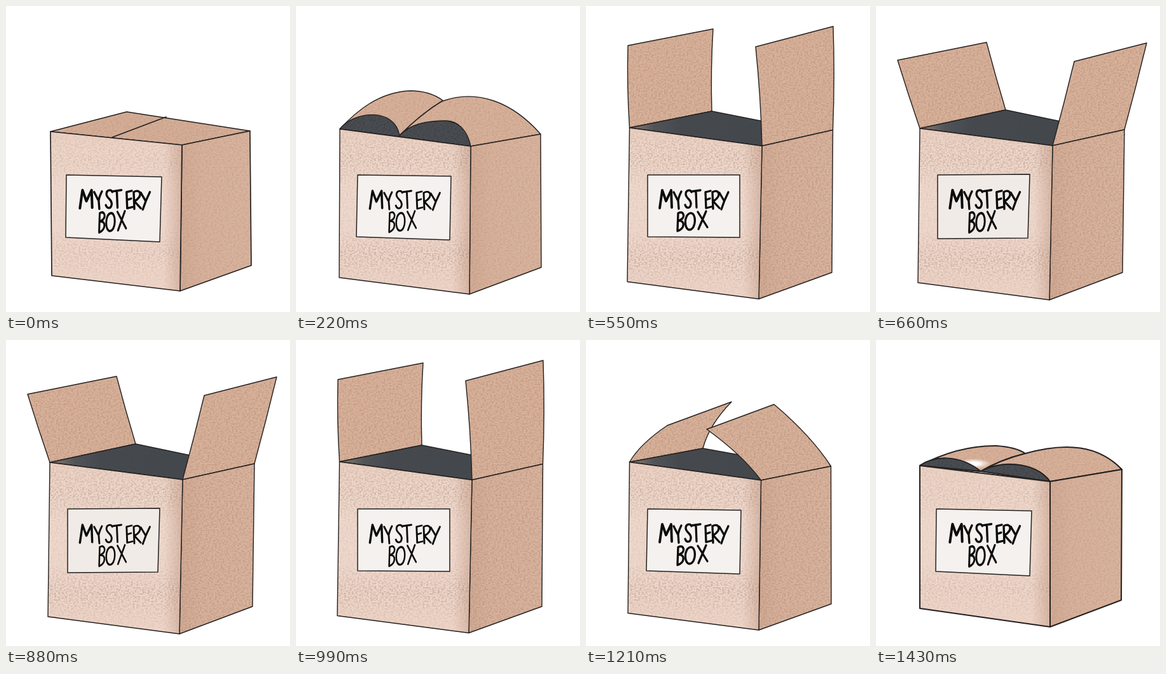
Write an HTML page that moves like this. It is 447x480 px and loops after 1540 ms.

```html
<!DOCTYPE html>
<html lang="en">
<head>
<meta charset="utf-8">
<title>Mystery box</title>
<style>
html, body { margin: 0; width: 100%; height: 100%; overflow: hidden; background: #fff; }
svg { display: block; width: 100vw; height: 100vh; }
.ink { stroke: #242121; stroke-linejoin: round; stroke-linecap: round; }
.word { fill: none; stroke: #0b0b0b; stroke-linecap: round; stroke-linejoin: round; }
</style>
</head>
<body>
<svg viewBox="0 0 447 480" role="img" aria-label="Mystery box">
  <defs>
    <linearGradient id="front" x2="0" y2="1">
      <stop offset="0" stop-color="#ebd1c3"/><stop offset=".13" stop-color="#eed7ca"/>
      <stop offset=".5" stop-color="#efd9cd"/><stop offset="1" stop-color="#edd4c7"/>
    </linearGradient>
    <linearGradient id="rim">
      <stop offset=".86" stop-color="#c39a84" stop-opacity="0"/><stop offset="1" stop-color="#c39a84" stop-opacity=".55"/>
    </linearGradient>
    <linearGradient id="side">
      <stop offset="0" stop-color="#d2ab95"/><stop offset=".3" stop-color="#d8b29c"/><stop offset="1" stop-color="#d9b49e"/>
    </linearGradient>
    <linearGradient id="dust" x2="0" y2="1">
      <stop offset="0" stop-color="#8e6a56" stop-opacity=".25"/><stop offset=".18" stop-color="#8e6a56" stop-opacity=".55"/>
      <stop offset=".34" stop-color="#8e6a56" stop-opacity=".2"/><stop offset=".6" stop-color="#8e6a56" stop-opacity=".2"/>
      <stop offset=".76" stop-color="#8e6a56" stop-opacity=".55"/><stop offset="1" stop-color="#8e6a56" stop-opacity=".08"/>
    </linearGradient>
    <linearGradient id="hollow">
      <stop offset="0" stop-color="#8d7d73"/><stop offset=".12" stop-color="#515457"/>
      <stop offset=".25" stop-color="#45494e"/><stop offset="1" stop-color="#42474c"/>
    </linearGradient>
    <radialGradient id="glow">
      <stop offset=".3" stop-color="#fff"/><stop offset="1" stop-color="#fff" stop-opacity="0"/>
    </radialGradient>
    <filter id="grain" x="0" y="0" width="1" height="1" color-interpolation-filters="sRGB">
      <feTurbulence type="fractalNoise" baseFrequency=".34 .42" numOctaves="3" seed="4"/>
      <feColorMatrix values="0 0 0 0 0  0 0 0 0 0  0 0 0 0 0  0 0 0 3 -1.2" result="n"/>
      <feComposite in="SourceGraphic" in2="n" operator="in"/>
    </filter>
  </defs>
  <g id="art"></g>
  <g id="text"></g>
</svg>
<script>
const STEP = 110, COUNT = 14;
const art = document.getElementById('art'), text = document.getElementById('text');

const mix = (a, b, t = .5) => a.map((v, i) => v + (b[i] - v) * t);

// Corners: front tl, tr, br, bl; side tr, br
const shut = [70,197, 277,218, 274,447, 72,423, 384,196, 386,407];
const loose = [69,197, 274,222, 274,450, 69,421, 387,203, 386,408];
const puffed = [69,193, 275,220, 273,452, 68,426, 385,201, 386,410];
const half = [68,190, 276,220, 271,458, 64,431, 386,195, 386,418];
const wide = [69,192, 278,219, 273,461, 66,434, 391,194, 388,418];
const boxes = [shut, loose, puffed, mix(puffed, half), half, mix(half, wide), wide, mix(half, wide, 1.3)];

const tagA = [95,265, 245,268, 242,370, 94,363];
const tagB = [97,265, 244,267, 242,367, 95,362];
const tagC = [97,265, 242,265, 242,363, 97,362];
const tagD = [97,265, 242,264, 239,364, 97,365];
const tags = [tagA, tagA, tagB, tagB, tagC, tagC, tagD, tagD];

// Open lids: free edge of each flap, rear hinge point, sideways bow
const lids = {
  3: { l: [128,134, 229,97], r: [190,140, 296,101], back: [184,170], bow: 13 },
  4: { l: [101,76, 222,56], r: [223,87, 340,70], back: [191,168], bow: 7 },
  5: { l: [66,62, 200,36], r: [267,64, 389,32], back: [198,165], bow: 3 },
  6: { l: [34,85, 174,57], r: [312,87, 426,58], back: [204,163], bow: 1 },
  7: { l: [3,108, 148,72], r: [336,106, 440,72], back: [208,160], bow: -2 }
};

const poly = p => 'M' + p.join(' ') + 'Z';
const path = (d, fill, w = 0) => `<path d="${d}" fill="${fill}"${w ? ` class="ink" stroke-width="${w}"` : ''}/>`;
const grain = (d, fill, o) => `<path d="${d}" fill="${fill}" opacity="${o}" filter="url(#grain)"/>`;
const card = (d, fill, w, o) => path(d, fill) + grain(d, '#8d6450', o) + path(d, 'none', w);

function flap(h1, h2, f, bow) {
  const bend = (a, b) => `Q${(a[0] + b[0]) / 2 + bow} ${(a[1] + b[1]) / 2} ${b.join(' ')}`;
  const a = f.slice(0, 2), b = f.slice(2);
  return `M${h1.join(' ')}${bend(h1, a)}L${b.join(' ')}${bend(b, h2)}Z`;
}

function lidShut(w) {
  return card('M70 197L190 166L384 196L277 218Z', '#d5ae97', w, .17) + path('M252 174L167 206', 'none', w);
}

function lidCurved(left, dark, right, w, gap) {
  return card(left, '#d8b19a', w, .18)
    + (gap ? '<ellipse cx="154" cy="194" rx="27" ry="8" fill="url(#glow)"/>' : '')
    + path(dark, '#4a4e53') + grain(dark, '#2a2e33', .35) + path(dark, 'none', w)
    + card(right, '#d8b19a', w, .18);
}

function lidOpen(k, b, w) {
  const { l, r, back, bow } = lids[k];
  const tl = b.slice(0, 2), tr = b.slice(2, 4), far = b.slice(8, 10);
  const dark = poly([...tl, ...back, far[0], far[1] + 8, ...tr]);
  return card(flap(tl, back, l, -bow), '#d9b29b', w, .27)
    + path(dark, 'url(#hollow)', w)
    + card(flap(tr, far, r, bow), '#d9b29b', w, .27);
}

function lid(k, b, w) {
  if (k === 0) return lidShut(w);
  if (k === 1) return lidCurved(
    'M69 197Q130 165 190 166Q220 168 235 178Q195 188 165 206Z',
    'M69 197C90 182 130 178 165 206C190 190 250 188 274 222L165 206Z',
    'M165 206Q195 188 235 178C300 160 350 165 387 203L274 222C250 188 190 190 165 206Z', w, true);
  if (k === 2) return lidCurved(
    'M69 193C95 165 130 135 180 133Q210 133 231 148Q195 170 163 203Z',
    'M69 193C90 165 155 158 163 203C180 185 200 180 236 180C262 183 272 200 275 220L163 205Z',
    'M163 203Q200 167 231 149C285 130 340 150 385 201L275 220C270 195 255 180 236 180C205 180 180 185 163 203Z', w);
  return lidOpen(k, b, w);
}

const bold = 'M116 317L120 289L126 306L134 289L135 316';
const letters = [
  'M138 292L144 304M150 291Q146 299 145 305L146 318',
  'M166 292C164 287 157 289 157 295C157 302 166 303 165 311C164 318 158 318 156 312',
  'M166 291L180 289M173 291L174 316',
  'M188 292L189 317L197 315M188 292L196 290M189 304L195 302',
  'M200 318L199 292C206 288 211 292 208 299Q205 304 200 306L210 317',
  'M210 293L217 305M224 292Q217 306 213 319'
].join('');
const boxWord = 'M145 325L144 352M145 325C153 321 156 329 151 334L146 337C156 336 156 349 144 353'
  + 'M164 325C154 327 154 351 163 351C174 350 174 323 164 325M176 323L191 347M189 322L177 350';

// Three hand-lettered takes that alternate
const takes = [
  { w: 3.3, top: 'matrix(1.02 0 0 1.02 -2 -6)', low: 'matrix(.9 0 0 1.08 17 -26)' },
  { w: 2.8, top: 'matrix(1.02 0 0 1 -2 1)', low: 'matrix(.9 0 0 1.07 17 -23)' },
  { w: 3.3, top: '', low: '' }
];

function draw(n) {
  const k = Math.min(n, COUNT - n), b = boxes[k];
  const w = k === 1 ? 2 : k === 0 ? 1.7 : 1.4;
  const front = poly(b.slice(0, 8));
  const side = poly([...b.slice(2, 4), ...b.slice(8), ...b.slice(4, 6)]);
  art.innerHTML = lid(k, b, w)
    + card(side, 'url(#side)', w, k < 3 ? .18 : .27)
    + path(front, 'url(#front)') + path(front, 'url(#rim)')
    + grain(front, 'url(#dust)', k < 2 ? .45 : .65) + path(front, 'none', w)
    + path(poly(tags[k]), k < 6 ? '#f4f1ee' : '#f1ebe7', 1.5);
  const t = takes[Math.floor(n / 2) % 3];
  text.innerHTML = `<g class="word" stroke-width="${t.w}"><g transform="${t.top}">`
    + `<path d="${bold}" stroke-width="${t.w + .6}"/><path d="${letters}"/></g>`
    + `<path d="${boxWord}" transform="${t.low}"/></g>`;
}

let shown = -1;
function tick(now) {
  const n = Math.floor(now / STEP) % COUNT;
  if (n !== shown) draw(shown = n);
  requestAnimationFrame(tick);
}
tick(0);
</script>
</body>
</html>
```
